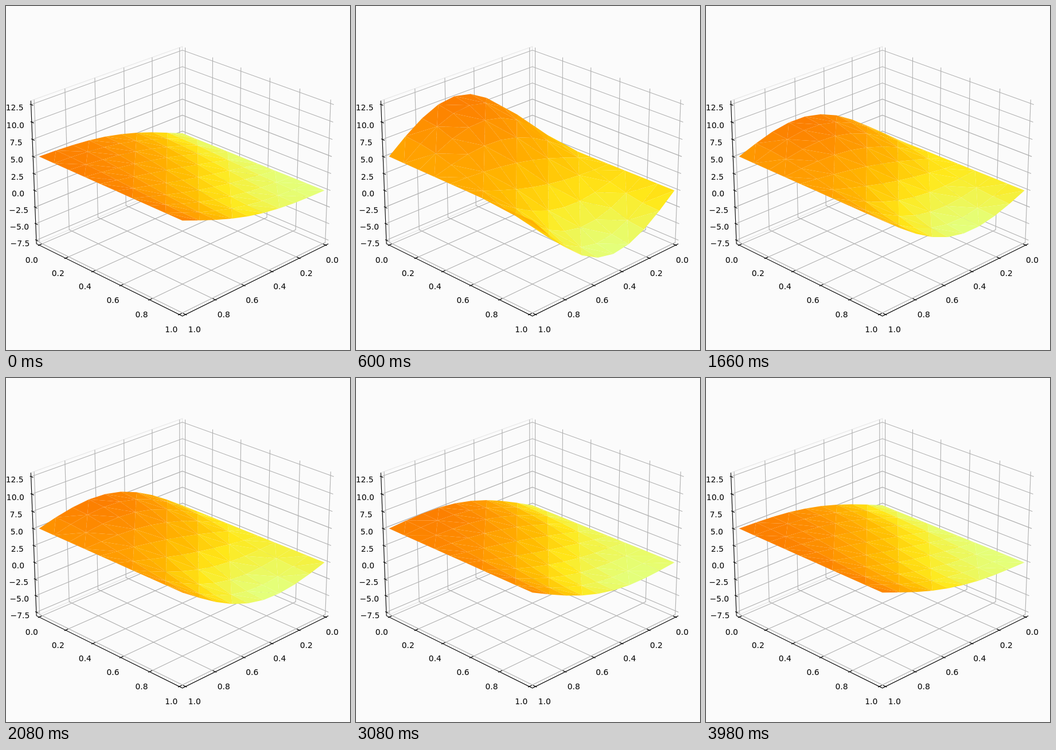
Write an HTML page with a canvas that moves like this. It is 600 px wide and 600 px high and loops after 4000 ms.

```html
<!DOCTYPE html>
<html lang="en">
<head>
<meta charset="utf-8">
<title>Diffusion on a square plate</title>
<style>
  html, body { margin: 0; width: 100%; height: 100%; overflow: hidden; background: #fbfbfb; }
  canvas { display: block; }
</style>
</head>
<body>
<canvas id="stage" width="600" height="600"></canvas>
<script>
const ctx = document.getElementById('stage').getContext('2d');
const N = 9, STEP = 20, STEPS = 200, DECAY = Math.PI * Math.PI / 1000;
const BG = '#fbfbfb', GRID = '#b0b0b0';
const EDGE = 1 / 48, LO = -EDGE, HI = 1 + EDGE;
const Z_MAX = 25 / 9 + 10 * Math.sin(5 * Math.PI / 9), Z_MIN = 5 - Z_MAX;
const WISTIA = [[228, 255, 122], [255, 232, 26], [255, 189, 0], [255, 160, 0], [252, 127, 0]];

// Perspective camera: azimuth 45 degrees, elevation 25 degrees, distance 10.
const ELEV = 25 * Math.PI / 180, SIN = Math.sin(ELEV), COS = Math.cos(ELEV);
const FOCAL = 570 / 0.185, CX = 15 + 0.095 * FOCAL, CY = 15 + 0.09 * FOCAL;

// x, y and z are fractions of the axis ranges.
function project(x, y, z) {
  const k = 8 / 7 * Math.SQRT1_2;
  const side = (y - x) * k, near = (x + y - 1) * k, up = (z - 0.5) * 6 / 7;
  const depth = 10 - near * COS - up * SIN;
  return [CX + side / depth * FOCAL, CY - (up * COS - near * SIN) / depth * FOCAL, depth];
}

const zFrac = z => (z - Z_MIN) / (Z_MAX - Z_MIN);

function path(points) {
  ctx.beginPath();
  for (const p of points) ctx.lineTo(p[0], p[1]);
}

function line(color, ...corners) {
  path(corners.map(c => project(...c)));
  ctx.strokeStyle = color;
  ctx.stroke();
}

function label(text, [x, y], dx, dy) {
  ctx.fillText(text, x + dx, y + dy);
}

function drawAxes() {
  ctx.lineWidth = 1.11;
  ctx.fillStyle = '#000';
  ctx.font = '13.89px "DejaVu Sans", sans-serif';
  ctx.textAlign = 'center';
  const ticks = [0, 0.2, 0.4, 0.6, 0.8, 1];
  const levels = Array.from({ length: 9 }, (_, i) => -7.5 + 2.5 * i);
  const out = 0.1 / 12, inn = 0.2 / 12;

  line('#e6e6e6', [HI, LO, LO], [LO, LO, LO], [LO, LO, HI], [HI, LO, HI], [HI, LO, LO]);
  for (const t of ticks) {
    line(GRID, [t, LO, HI], [t, LO, LO], [t, HI, LO]);
    line(GRID, [LO, t, HI], [LO, t, LO], [HI, t, LO]);
  }
  for (const v of levels) {
    const z = zFrac(v);
    line(GRID, [HI, LO, z], [LO, LO, z], [LO, HI, z]);
  }

  line('#000', [HI, LO, HI], [HI, LO, LO], [HI, HI, LO], [LO, HI, LO]);
  for (const t of ticks) {
    line('#000', [t, HI + out, LO], [t, HI - inn, LO]);
    line('#000', [HI + out, t, LO], [HI - inn, t, LO]);
    label(t.toFixed(1), project(t, HI, LO), 11.5 + 4 * t, 31);
    label(t.toFixed(1), project(HI, t, LO), -13 - t, 31);
  }
  for (const v of levels) {
    const z = zFrac(v);
    line('#000', [HI, LO - out, z], [HI, LO + inn, z]);
    label(v.toFixed(1).replace('-', '\u2212'), project(HI, LO, z), -28.5, 10.5);
  }
}

function makeTriangles() {
  const steep = new Set([-8, -6, -3, -1, 1, 3, 6]);
  const list = [];
  for (let i = 0; i < N; i++) for (let j = 0; j < N; j++) {
    const a = [i, j], b = [i + 1, j], c = [i + 1, j + 1], d = [i, j + 1];
    if (steep.has(j - i)) list.push([a, b, c], [a, c, d]);
    else list.push([a, b, d], [b, c, d]);
  }
  return list;
}
const triangles = makeTriangles();

function colour(f) {
  const s = f * 4, i = Math.min(3, Math.floor(s));
  const rgb = WISTIA[i].map((v, c) => Math.round(v + (WISTIA[i + 1][c] - v) * (s - i)));
  return `rgb(${rgb})`;
}

const mean = values => values.reduce((a, b) => a + b, 0) / values.length;

function drawSurface(amp) {
  const height = ([i, j]) =>
    5 * i / N + amp * Math.sin(Math.PI * i / N) * Math.cos(Math.PI * j / N);
  const faces = triangles.map(tri => {
    const zs = tri.map(height);
    const points = tri.map(([i, j], k) => project(i / N, j / N, zFrac(zs[k])));
    return { points, z: mean(zs), depth: mean(points.map(p => p[2])) };
  });
  const zs = faces.map(f => f.z), lo = Math.min(...zs), hi = Math.max(...zs);
  faces.sort((a, b) => b.depth - a.depth);
  for (const f of faces) {
    path(f.points);
    ctx.fillStyle = colour((f.z - lo) / (hi - lo));
    ctx.fill();
  }
}

function draw() {
  const step = Math.floor(performance.now() / STEP) % STEPS;
  const n = (step + STEPS - 1) % STEPS; // the loop opens on the last state
  ctx.fillStyle = BG;
  ctx.fillRect(0, 0, 600, 600);
  drawAxes();
  drawSurface(10 * Math.exp(-DECAY * n));
  requestAnimationFrame(draw);
}
draw();
</script>
</body>
</html>
```
